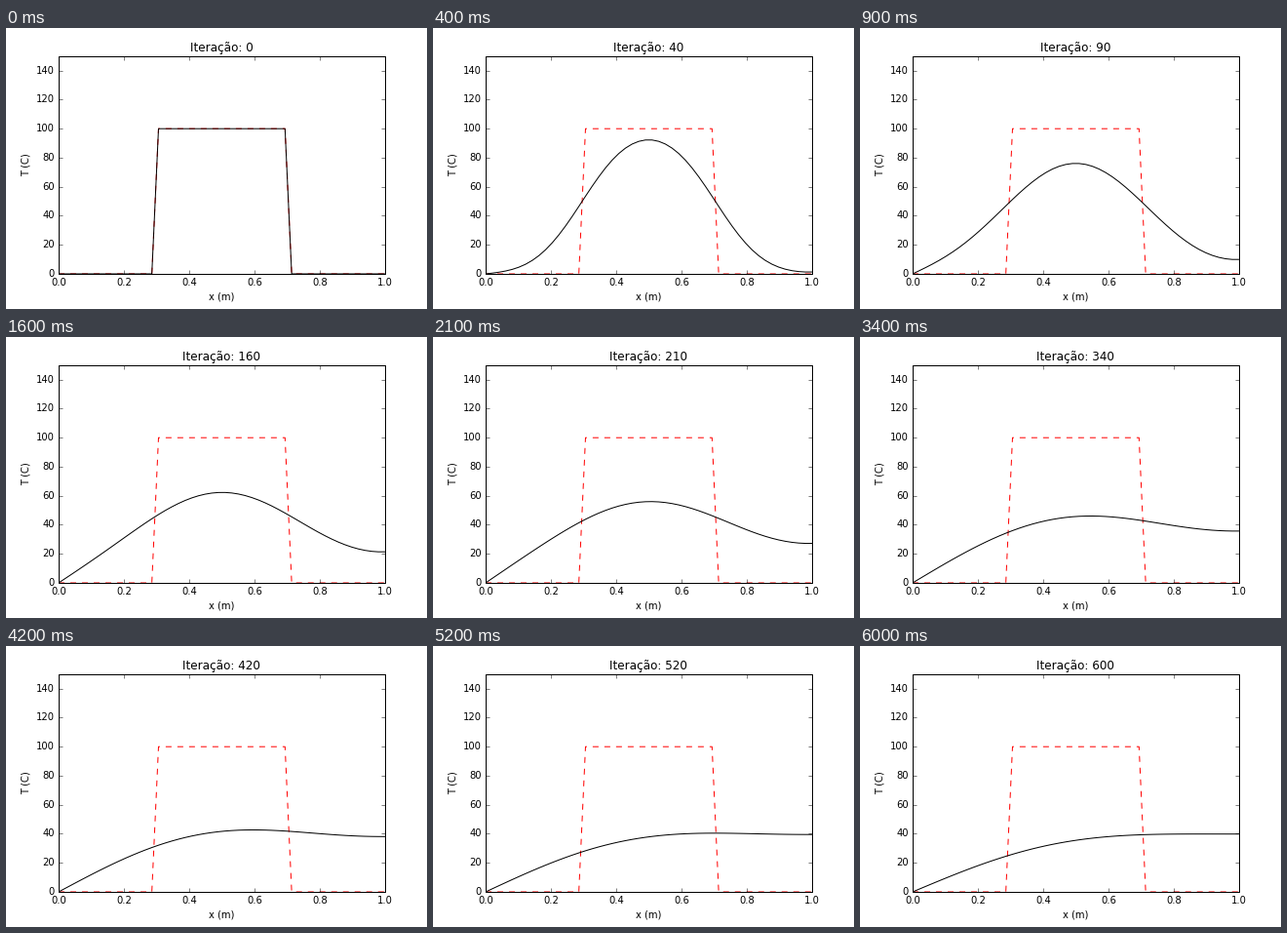
A matplotlib script for the animation above (6.1 s loop, 432x288 px).

```python
import numpy as np
import matplotlib.pyplot as plt
from matplotlib.animation import FuncAnimation

NODES = 50
FOURIER = 0.4          # alpha * dt / dx**2
STEPS_PER_FRAME = 10
FRAMES = 61

plt.style.use("classic")
plt.rcParams.update({
    "font.family": "DejaVu Sans",
    "font.size": 10,
    "axes.titlesize": 12,
    "axes.labelsize": 10,
    "xtick.labelsize": 10,
    "ytick.labelsize": 10,
    "figure.facecolor": "white",
    "savefig.facecolor": "white",
    "savefig.dpi": "figure",
    "figure.subplot.left": 0.125,
    "figure.subplot.right": 0.9,
    "figure.subplot.bottom": 0.125,
    "figure.subplot.top": 0.9,
})


def diffuse(temp):
    """One explicit step: cold wall on the left, insulated on the right."""
    new = temp.copy()
    new[1:-1] += FOURIER * (temp[2:] - 2 * temp[1:-1] + temp[:-2])
    new[0] = 0
    new[-1] = new[-2]
    return new


def solve(start):
    profiles = [start]
    for _ in range(FRAMES - 1):
        temp = profiles[-1]
        for _ in range(STEPS_PER_FRAME):
            temp = diffuse(temp)
        profiles.append(temp)
    return profiles


x = np.linspace(0, 1, NODES)
initial = np.where((x > 0.3) & (x < 0.7), 100.0, 0.0)
profiles = solve(initial)

fig, ax = plt.subplots(figsize=(6, 4), dpi=72)
ax.plot(x, initial, "r--")
curve, = ax.plot(x, initial, "k-")
ax.set_xlim(0, 1)
ax.set_ylim(0, 150)
ax.set_xticks(np.linspace(0, 1, 6))
ax.set_yticks(range(0, 141, 20))
ax.set_xlabel("x (m)")
ax.set_ylabel("T (C)")
title = ax.set_title("Iteração: 0")


def draw(frame):
    curve.set_ydata(profiles[frame])
    title.set_text(f"Iteração: {frame * STEPS_PER_FRAME}")
    return curve, title


anim = FuncAnimation(fig, draw, frames=FRAMES, interval=100,
                     repeat=True, repeat_delay=0, blit=False)
plt.show()
```
